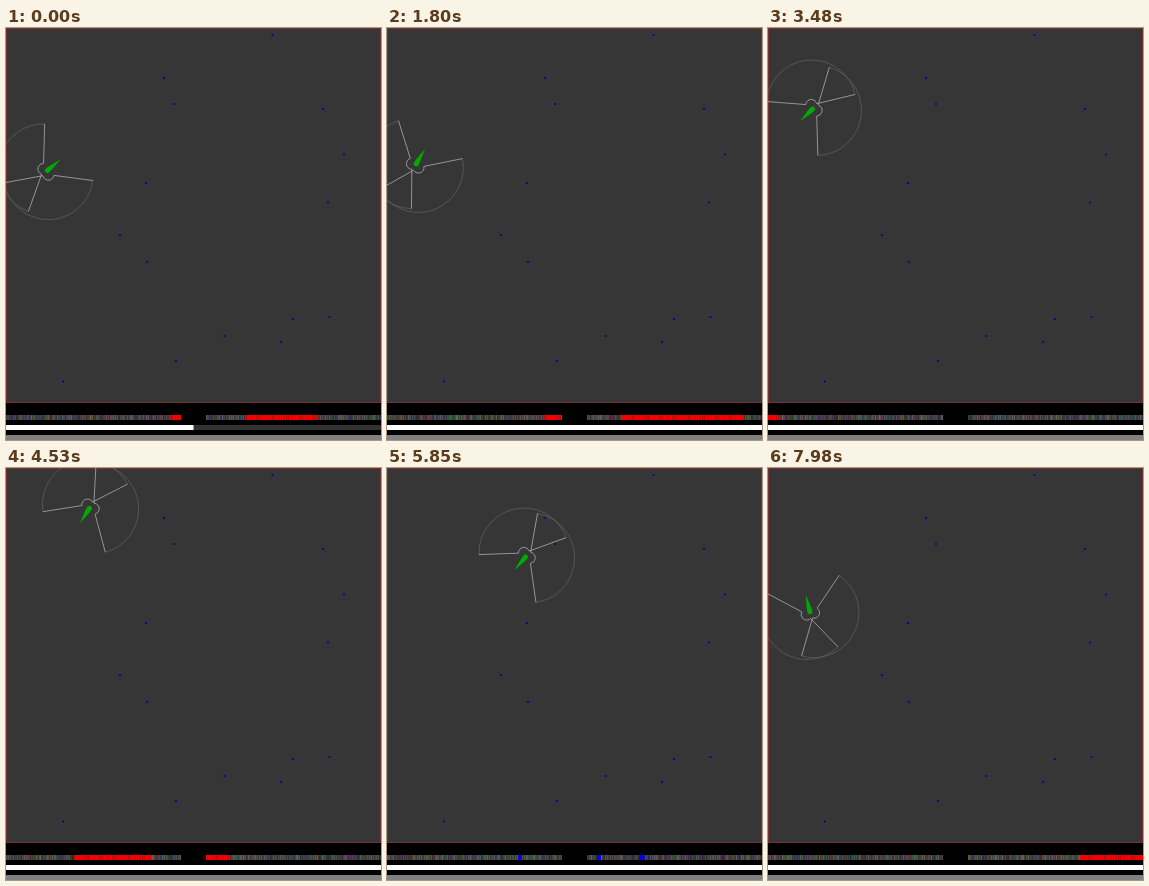
Animation of 375x412 px, one loop 8 s. Source, as an HTML page with a canvas:

```html
<!DOCTYPE html>
<html lang="en">
<head>
<meta charset="utf-8">
<title>Swimmer with two eyes</title>
<style>
  html, body { margin: 0; width: 100%; height: 100%; overflow: hidden; background: #000; }
  canvas { display: block; }
</style>
</head>
<body>
<canvas id="stage" width="375" height="412"></canvas>
<script>
const ctx = document.getElementById('stage').getContext('2d');
const LOOP = 8000, STEP = 30, FIELD = 375;
const SPEED = 80;                     // px per second at each waypoint
const REACH = 45, EYE_RADIUS = 5.6, EYE_OFFSET = 3.75;
const RAD = Math.PI / 180;
const OUTER = 132 * RAD, INNER = 30 * RAD, SPAN = OUTER + INNER;
const CELLS = 100, BAR_WIDTH = 175;

// time (ms), x, y, heading (degrees)
const waypoints = [
  [0, 39.9, 143.8, 139.5],
  [1110, 55.4, 131.9, 203.6],
  [2460, 28, 126.5, 274],
  [4530, 84.5, 38.7, 303],
  [5850, 139.8, 87.4, 310],
  [6720, 81.7, 99, 105.5],
  [7980, 42.4, 145.6, 76]
];

const food = [
  [266.5, 7], [158, 50], [168, 76], [317, 81], [338, 126.5],
  [140, 155], [322, 174.5], [114, 207], [141, 234], [287, 291],
  [323.5, 289], [218.5, 308], [275, 314], [170, 333], [57, 353.5]
];

function random(seed) {
  let n = Math.imul(seed + 1, 0x9E3779B1);
  n = Math.imul(n ^ (n >>> 15), 0x85EBCA6B);
  n = Math.imul(n ^ (n >>> 13), 0xC2B2AE35);
  return ((n ^ (n >>> 16)) >>> 0) / 4294967296;
}

// Cubic Hermite path; the swimmer faces along its velocity.
function poseAt(time) {
  let i = 0;
  while (i < waypoints.length - 2 && time >= waypoints[i + 1][0]) i++;
  const [t0, x0, y0, h0] = waypoints[i];
  const [t1, x1, y1, h1] = waypoints[i + 1];
  const u = Math.min(1, (time - t0) / (t1 - t0));
  const pull = SPEED * (t1 - t0) / 1000;
  const axis = (a, b, va, vb) => {
    const d = b - a, c2 = 3 * d - 2 * va - vb, c3 = va + vb - 2 * d;
    return [a + u * (va + u * (c2 + u * c3)), va + u * (2 * c2 + 3 * u * c3)];
  };
  const [x, vx] = axis(x0, x1, pull * Math.cos(h0 * RAD), pull * Math.cos(h1 * RAD));
  const [y, vy] = axis(y0, y1, pull * Math.sin(h0 * RAD), pull * Math.sin(h1 * RAD));
  return { x, y, heading: Math.atan2(vy, vx) };
}

// Each eye scans clockwise from its start angle.
function makeEye({ x, y, heading }, side) {
  const a = heading + side * Math.PI / 2;
  return {
    x: x + EYE_OFFSET * Math.cos(a),
    y: y + EYE_OFFSET * Math.sin(a),
    start: heading - (side < 0 ? OUTER : INNER)
  };
}

function seenColor(eye, angle) {
  for (const [fx, fy] of food) {
    const dx = fx - eye.x, dy = fy - eye.y, d = Math.hypot(dx, dy);
    if (d > REACH) continue;
    const off = Math.atan2(dy, dx) - angle;
    if (Math.cos(off) > Math.cos(Math.asin(Math.min(1, 1.4 / d)))) return '#0000f0';
  }
  const x = eye.x + REACH * Math.cos(angle), y = eye.y + REACH * Math.sin(angle);
  return x < 0 || y < 0 || x > FIELD || y > FIELD ? '#f00' : null;
}

function drawRetina(eye, left, seed) {
  const w = BAR_WIDTH / CELLS;
  for (let i = 0; i < CELLS; i++) {
    const channel = k => 45 + 60 * random(seed + i * 3 + k);
    ctx.fillStyle = seenColor(eye, eye.start + SPAN * (i + 0.5) / CELLS)
      || `rgb(${channel(0)},${channel(1)},${channel(2)})`;
    ctx.fillRect(left + i * w, 387, w, 5);
  }
}

function drawEye({ x, y, start }) {
  const end = start + SPAN;
  ctx.lineWidth = 0.75;
  ctx.strokeStyle = '#606060';
  ctx.beginPath();
  ctx.arc(x, y, REACH, start, end);
  ctx.stroke();

  ctx.strokeStyle = '#b4b4b4';
  ctx.beginPath();
  ctx.moveTo(x + REACH * Math.cos(start), y + REACH * Math.sin(start));
  ctx.arc(x, y, EYE_RADIUS, start, end);
  ctx.lineTo(x + REACH * Math.cos(end), y + REACH * Math.sin(end));
  ctx.stroke();
}

function drawBody({ x, y, heading }) {
  ctx.save();
  ctx.translate(x, y);
  ctx.rotate(heading);
  ctx.fillStyle = '#0a0';
  ctx.beginPath();
  ctx.arc(-2, 0, 2.5, -Math.PI / 2, Math.PI / 2);
  ctx.lineTo(-6, 2.2);
  ctx.lineTo(-19.5, 0);
  ctx.lineTo(-6, -2.2);
  ctx.fill();
  ctx.restore();
}

function fillBox(color, x, y, w, h) {
  ctx.fillStyle = color;
  ctx.fillRect(x, y, w, h);
}

function draw(time) {
  const step = Math.floor(time / STEP);
  const pose = poseAt(step * STEP);
  const eyes = [makeEye(pose, -1), makeEye(pose, 1)];

  fillBox('#000', 0, 0, 375, 412);
  fillBox('#363636', 0, 0, FIELD, FIELD);
  ctx.lineWidth = 1;
  ctx.strokeStyle = '#733';
  ctx.strokeRect(0.5, 0.5, FIELD - 1, FIELD - 1);

  ctx.fillStyle = '#00009b';
  for (const [x, y] of food) {
    ctx.beginPath();
    ctx.arc(x, y, 1.1, 0, 2 * Math.PI);
    ctx.fill();
  }
  eyes.forEach(drawEye);
  drawBody(pose);

  eyes.forEach((eye, i) => drawRetina(eye, i * 200, (step * 2 + i) * CELLS * 3));
  fillBox('#323232', 0, 397, 375, 5);
  fillBox('#fff', 0, 397, step ? 375 : 187.5, 5);
  fillBox('#808080', 0, 407, 375, 5);
}

const began = performance.now();
function tick() {
  draw((performance.now() - began) % LOOP);
  requestAnimationFrame(tick);
}
tick();
</script>
</body>
</html>
```
